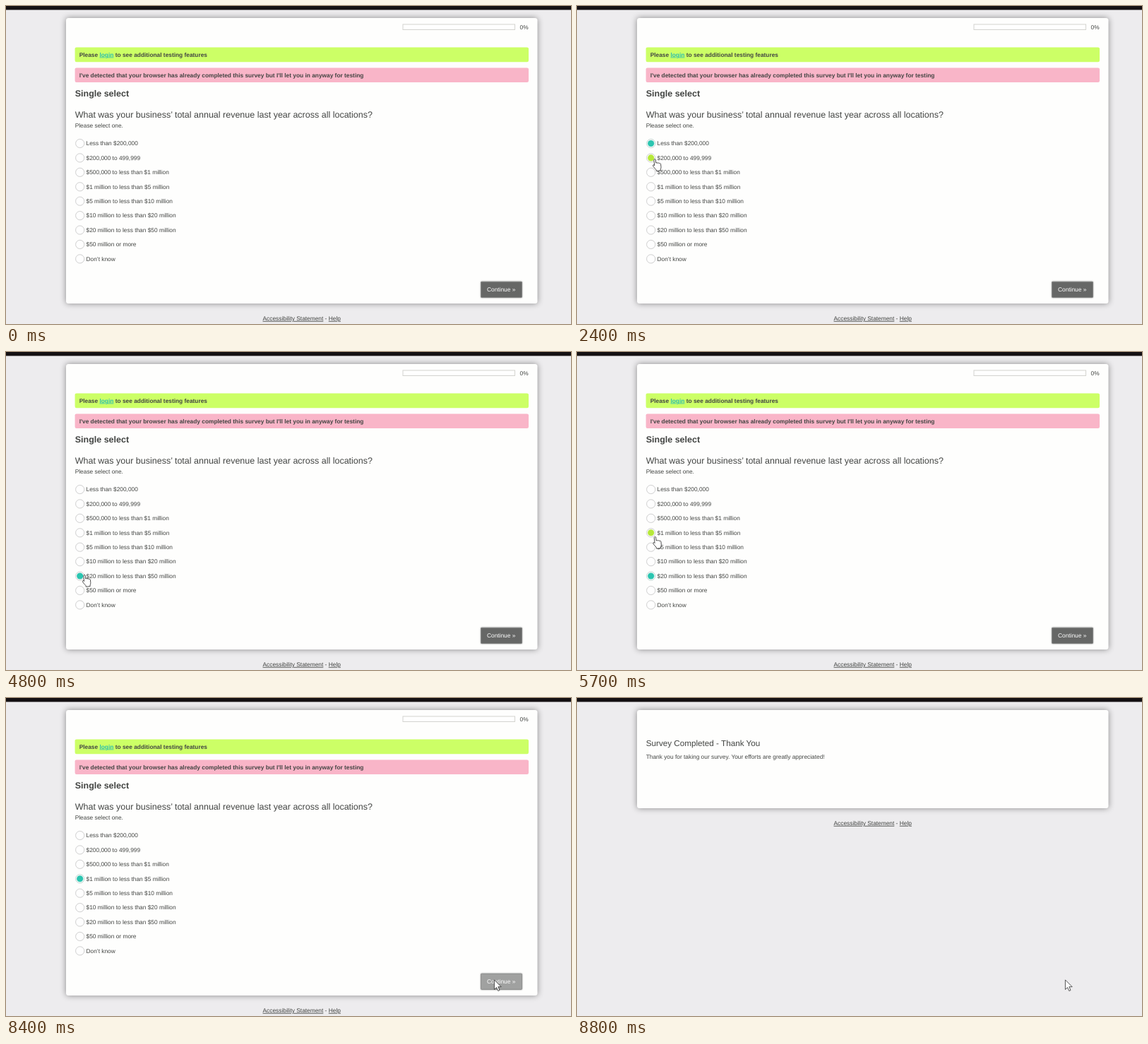
Recreate the animation shown at these times as an HTML page. Size 800 by 450 pixels, loop 9100 ms.

```html
<!DOCTYPE html>
<html lang="en">
<head>
<meta charset="utf-8">
<title>Survey</title>
<style>
  html, body { margin: 0; width: 100%; height: 100%; overflow: hidden; background: #edecee; }
  svg { display: block; width: 800px; height: 450px; }
  text { font: 8.35px "Liberation Sans", Arial, sans-serif; fill: #434543; text-rendering: geometricPrecision; white-space: pre; }
  .bold { font-weight: bold; }
  .large { font-size: 12.5px; }
  .title { font-size: 11.7px; }
  .link { text-decoration: underline; }
  .login { fill: #2fbfae; }
  .card { fill: #fefefd; filter: drop-shadow(0 .5px 4.3px rgba(0, 0, 0, .43)); }
  .button { stroke: #858685; stroke-width: .8; filter: drop-shadow(.5px .6px .8px rgba(0, 0, 0, .4)); }
  .ring { fill: #fefefe; stroke: #cfcfcf; stroke-width: 1; }
  .pointer { fill: #fff; stroke: #2c2c2c; stroke-width: .8; stroke-linejoin: round; }
</style>
</head>
<body>
<svg viewBox="0 0 800 450">
  <rect width="800" height="450" fill="#edecee"/>
  <rect width="800" height="5.5" fill="#141012"/>

  <g id="survey">
    <rect class="card" x="85" y="17" width="667.5" height="404" rx="3.5"/>
    <rect x="562" y="26" width="158.5" height="7.5" fill="#fff" stroke="#d3d3cf"/>
    <text x="727.5" y="32.8">0%</text>
    <rect x="97.6" y="58.4" width="642.4" height="20.8" rx="2.2" fill="#ccff66"/>
    <text class="bold" x="103.7" y="71.5">Please <tspan class="link login">login</tspan> to see additional testing features</text>
    <rect x="97.6" y="87.4" width="642.4" height="20.6" rx="2.2" fill="#f9b5c8"/>
    <text class="bold" x="103.7" y="100.6">I've detected that your browser has already completed this survey but I'll let you in anyway for testing</text>
    <text class="bold large" x="97.7" y="127.6">Single select</text>
    <text class="large" x="97.7" y="157.8">What was your business’ total annual revenue last year across all locations?</text>
    <text x="97.7" y="172.4">Please select one.</text>
    <g id="options"></g>
    <rect id="button" class="button" x="672.4" y="390.2" width="58.2" height="22.2" rx="1"/>
    <text x="681" y="404" style="fill:#fff">Continue »</text>
  </g>

  <g id="thanks">
    <rect class="card" x="85" y="17" width="667.5" height="139" rx="3.5"/>
    <text class="title" x="97.7" y="68.3">Survey Completed - Thank You</text>
    <text x="97.7" y="85.9">Thank you for taking our survey. Your efforts are greatly appreciated!</text>
  </g>

  <text id="footer" x="363.5"><tspan class="link">Accessibility Statement</tspan> - <tspan class="link">Help</tspan></text>

  <g id="cursor" class="pointer">
    <path id="arrow" d="M0 0V13.6L3.1 10.7L5.4 15.6L7.6 14.6L5.4 9.8H9.8Z"/>
    <path id="hand" transform="rotate(-6) translate(-5.3 -.4)" d="M2.4 1.3Q3.6 -.4 4.8 1.3V6.2Q6.1 5.3 7.1 6.6Q8.4 5.8 9.3 7.2Q10.9 6.6 11.4 8.3V12.5Q11.3 14.5 10.2 16V17.6H4.2V16Q2.6 14 .8 11.2Q-.4 9.2 .8 8.5Q1.7 8.2 2.4 9.6Z"/>
  </g>
</svg>

<script>
const LOOP = 9100, STEP = 100, DONE = 8500;
const LIME = '#b6e83a', TEAL = '#2cc5b0';
const ROW_TOP = 194.5, ROW_GAP = 20.42;

const labels = [
  'Less than $200,000',
  '$200,000 to 499,999',
  '$500,000 to less than $1 million',
  '$1 million to less than $5 million',
  '$5 million to less than $10 million',
  '$10 million to less than $20 million',
  '$20 million to less than $50 million',
  '$50 million or more',
  'Don’t know'
];

// time, x, y of the pointer tip
const path = [
  [100, 40, 440], [1000, 88, 215], [1300, 111.5, 197], [2100, 111.5, 197],
  [2900, 112, 258], [4000, 112, 258], [4500, 112.5, 315], [5000, 112.5, 315],
  [5400, 110, 256], [5500, 110, 256], [5700, 112, 261], [6100, 112, 261],
  [6500, 600, 346], [6700, 600, 346], [6800, 638.5, 366], [7400, 691.4, 398.9],
  [LOOP, 691.4, 398.9]
];

// time, chosen row
const clicks = [[0, -1], [1700, 0], [3500, 3], [4700, 6], [5900, 3]];

const byId = id => document.getElementById(id);
const show = (id, on) => byId(id).setAttribute('display', on ? 'inline' : 'none');

function add(tag, attrs) {
  const node = document.createElementNS('http://www.w3.org/2000/svg', tag);
  for (const key in attrs) node.setAttribute(key, attrs[key]);
  return byId('options').appendChild(node);
}

const rows = labels.map((label, i) => {
  const y = ROW_TOP + i * ROW_GAP;
  const ring = add('circle', { class: 'ring', cx: 104.7, cy: y, r: 6.1 });
  const dot = add('circle', { cx: 104.7, cy: y, r: 4.6 });
  add('text', { x: 113.5, y: y + 2.8 }).textContent = label;
  return { ring, dot };
});

function tipAt(t) {
  const i = path.findIndex(p => p[0] > t);
  const [t0, x0, y0] = path[Math.max(i - 1, 0)], [t1, x1, y1] = path[i];
  const k = Math.max(0, (t - t0) / (t1 - t0));
  const e = k * k * (3 - 2 * k);
  return [x0 + (x1 - x0) * e, y0 + (y1 - y0) * e];
}

function hoveredRow(x, y) {
  const row = Math.round((y - ROW_TOP) / ROW_GAP);
  return x > 98 && x < 245 && row < rows.length ? row : -1;
}

function draw(t) {
  const done = t >= DONE;
  const [x, y] = tipAt(t);
  const hover = done ? -1 : hoveredRow(x, y);
  const chosen = clicks.filter(c => c[0] <= t).pop()[1];

  show('survey', !done);
  show('thanks', done);
  byId('footer').setAttribute('y', done ? 179.8 : 444.8);

  rows.forEach(({ ring, dot }, i) => {
    const on = i === chosen, over = i === hover;
    dot.setAttribute('fill', on ? TEAL : over ? LIME : 'none');
    ring.style.stroke = on && !over ? '#bfd6d1' : '';
  });
  byId('button').setAttribute('fill', x > 672 && y > 390 ? '#a0a1a0' : '#666766');

  show('cursor', t >= path[0][0]);
  show('hand', hover >= 0);
  show('arrow', hover < 0);
  byId('cursor').setAttribute('transform', `translate(${x} ${y})`);
}

const start = performance.now();
function tick() {
  const t = (performance.now() - start) % LOOP;
  draw(Math.floor(t / STEP) * STEP);
  requestAnimationFrame(tick);
}
tick();
</script>
</body>
</html>
```
